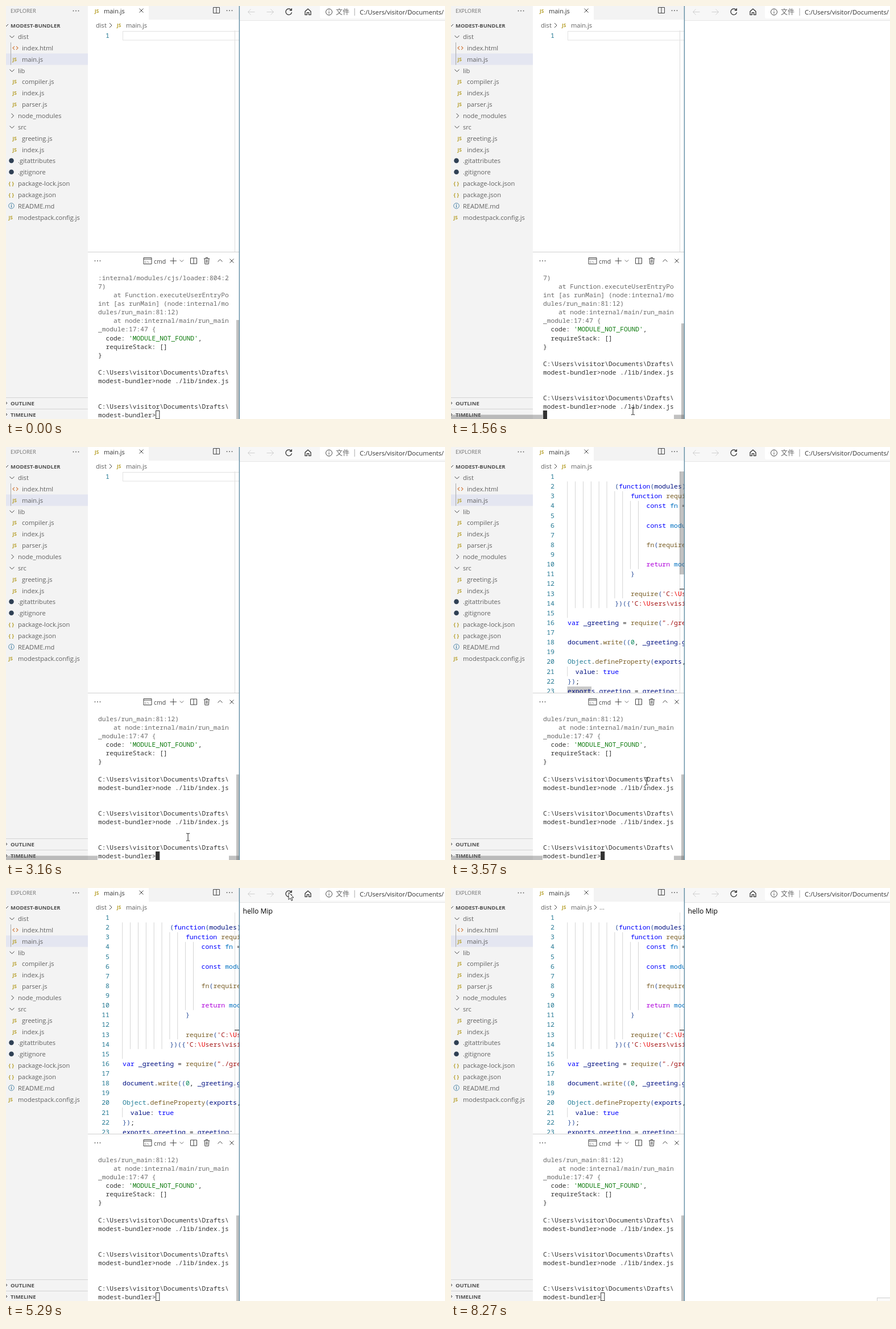
An HTML page for the animation above (8300 ms loop, 772 by 726 pixels).

```html
<!DOCTYPE html>
<html lang="en">
<head>
<meta charset="utf-8">
<title>Bundler demo</title>
<style>
  html, body { margin: 0; width: 100%; height: 100%; overflow: hidden; background: #fff; }
  svg { display: block; width: 772px; height: 726px; }
  text { white-space: pre; font-family: "Open Sans", "Noto Sans CJK SC", "Noto Sans CJK", sans-serif; }
  .mono { font-family: "Noto Sans Mono", "DejaVu Sans Mono", monospace; }
  .icon { fill: none; stroke: #424242; stroke-width: 1; }
</style>
</head>
<body>
<svg id="stage" viewBox="0 0 772 726"></svg>
<script>
const LOOP = 8300;
const PROJECT = 'modest-bundler';
const USER = 'visitor';
const stage = document.getElementById('stage');

const escapeText = s => s.replace(/&/g, '&amp;').replace(/</g, '&lt;');
const text = (x, y, s, size = 11.1, fill = '#616161', extra = '') =>
  `<text x="${x}" y="${y}" font-size="${size}" fill="${fill}" ${extra}>${escapeText(s)}</text>`;
const rect = (x, y, w, h, fill, extra = '') =>
  `<rect x="${x}" y="${y}" width="${w}" height="${h}" fill="${fill}" ${extra}/>`;
const path = (d, extra = '') => `<path class="icon" d="${d}" ${extra}/>`;
const dots = (x, y) => [-4.5, 0, 4.5].map(dx => rect(x + dx - .8, y - .8, 1.6, 1.6, '#555')).join('');
const chevron = (x, y, turn = 0) =>
  path('M-2 -4L2 0L-2 4', `transform="translate(${x} ${y}) rotate(${turn})"`);
const cross = (x, y) => path(`M${x - 3.5} ${y - 3.5}l7 7m0 -7l-7 7`);
const split = (x, y) => path(`M${x - 5.5} ${y - 5}h11v10h-11zm5.5 0v10`);
const jsBadge = (x, y) => text(x, y + 3, 'JS', 8.3, '#b7a02c', 'font-weight="700"');

// Sidebar
const FILES = [
  ['open', 0, 'dist'], ['html', 1, 'index.html'], ['js', 1, 'main.js'],
  ['open', 0, 'lib'], ['js', 1, 'compiler.js'], ['js', 1, 'index.js'], ['js', 1, 'parser.js'],
  ['shut', 0, 'node_modules'], ['open', 0, 'src'], ['js', 1, 'greeting.js'], ['js', 1, 'index.js'],
  ['dot', 0, '.gitattributes'], ['dot', 0, '.gitignore'],
  ['json', 0, 'package-lock.json'], ['json', 0, 'package.json'],
  ['info', 0, 'README.md'], ['js', 0, 'modestpack.config.js'],
];
const FILE_ICONS = {
  open: (x, y) => chevron(x + 1, y, 90),
  shut: (x, y) => chevron(x + 2, y),
  js: (x, y) => jsBadge(x - 5, y),
  html: (x, y) => path(`M${x - 1.5} ${y - 3}l-3 3l3 3m3 -6l3 3l-3 3`, 'style="stroke:#d17b3f;stroke-width:1.2"'),
  dot: (x, y) => `<circle cx="${x}" cy="${y - .5}" r="4.3" fill="#2f4054"/>`,
  json: (x, y) => text(x - 5, y + 3, '{ }', 9, '#b7a02c', 'font-weight="700"'),
  info: (x, y) => `<circle cx="${x}" cy="${y - .5}" r="4.8" fill="none" stroke="#4f87a8"/>` +
    rect(x - .7, y - 1.5, 1.4, 4, '#4f87a8') + rect(x - .7, y - 3.6, 1.4, 1.4, '#4f87a8'),
};

function sidebar() {
  const section = (y, label) => chevron(0, y) + text(8, y + 3.8, label, 9.5, '#505050', 'font-weight="700"');
  const rows = FILES.map(([icon, depth, name], i) => {
    const y = 54 + 19.85 * i;
    return FILE_ICONS[icon](9.5 + 7 * depth, y) + text(21 + 7 * depth, y + 4, name);
  });
  return rect(0, 0, 144, 726, '#f3f3f3') + rect(0, 83.5, 144, 20, '#e4e6f1') +
    rect(8, 64, 1, 39.5, '#a9a9a9') +
    text(8, 12, 'EXPLORER', 9.3, '#6f6f6f') + dots(123, 8.5) +
    chevron(0, 34, 90) + text(8, 37.5, PROJECT.toUpperCase(), 9.5, '#505050', 'font-weight="700"') +
    rows.join('') + rect(0, 688, 144, 1, '#d4d4d4') + section(698, 'OUTLINE') +
    rect(0, 708, 144, 1, '#d4d4d4') + section(718, 'TIMELINE');
}

// Editor
const COL = 6.93, LINE = 17.13;
const CODE = [
  '',
  '            (function(modules){', '                function require(', '                    const fn = ',
  '', '                    const module', '', '                    fn(require(', '',
  '                    return module', '                }', '',
  `                require('C:\\Users\\`, `            })({'C:\\Users\\${USER}`,
  '', 'var _greeting = require("./greeting', '', 'document.write((0, _greeting.greet', '',
  'Object.defineProperty(exports, ', '  value: true', '});', 'exports.greeting = greeting;',
];
const TOKENS = [
  [/^['"].*/, '#a31515'],
  [/^(function|const|var|true)\b/, '#0000ff'],
  [/^return\b/, '#af00db'],
  [/^(require|write|defineProperty)\b|^fn(?=\()/, '#795e26'],
  [/^(fn|module)\b/, '#0070c1'],
  [/^Object\b/, '#267f99'],
  [/^\w*[a-z_]\w*/i, '#001080'],
  [/^\d+/, '#098658'],
  [/^[(){}]/, '#2b4f9c'],
  [/^[^\w'"(){}]+/, '#222'],
];
function highlight(line) {
  let out = '';
  while (line) {
    const [rule, color] = TOKENS.find(([r]) => r.test(line));
    const token = line.match(rule)[0];
    const body = escapeText(token).replace(/\\U/g, '<tspan fill="#ee0000">\\U</tspan>');
    out += `<tspan fill="${color}">${body}</tspan>`;
    line = line.slice(token.length);
  }
  return out;
}
const lineNumber = (n, fill) =>
  text(182, 56 + LINE * (n - 1), String(n), 11.55, fill, 'class="mono" text-anchor="end"');

function codeView() {
  const guide = (k, from, to) =>
    rect(204.3 + 2 * COL * k, 60.5 + LINE * (from - 2), .9, LINE * (to - from + 1), '#d0d0d0');
  let out = guide(0, 2, 15) + guide(0, 21, 21);
  for (let k = 1; k < 10; k++) out += k < 6 ? guide(k, 2, 14) : k < 8 ? guide(k, 3, 13) : guide(k, 4, 10);
  CODE.forEach((line, i) => {
    const code = line.trimStart(), x = 205 + COL * (line.length - code.length);
    if (i) out += lineNumber(i + 1, '#237893');
    out += `<text class="mono" font-size="11.55" x="${x}" y="${56 + LINE * i}">${highlight(code)}</text>`;
  });
  return out + rect(402, 249, 8, 1.5, '#555');
}

function editor() {
  return rect(144, 0, 266, 24, '#f3f3f3') + rect(144, 0, 107, 24, '#fff') +
    jsBadge(156, 8.5) + text(172, 12.5, 'main.js', 11, '#333') + cross(238, 8) + split(370, 7.5) + dots(393, 8) +
    text(158, 38, 'dist') + chevron(184, 34) + jsBadge(195, 34) + text(211, 38, 'main.js') +
    `<g id="crumb">${chevron(254, 34)}${text(261, 38, '...')}</g>` +
    lineNumber(1, '#237893') + rect(402, 43, 1, 389, '#dcdcdc') +
    `<g id="blank">${rect(205.5, 44.5, 210, 15.5, 'none', 'stroke="#e2e2e2" clip-path="url(#editorClip)"')}</g>` +
    `<g id="code" clip-path="url(#editorClip)">
      <g id="mark">${rect(204.5, 421, 42.5, 11, '#c9c9c9')}</g>${codeView()}</g>` +
    rect(402, 43, 8, 181, '#646464', 'id="thumb"');
}

// Terminal
const CELL = 6.755, ROW = 15.03;
const FOLDER = `C:\\Users\\${USER}\\Documents\\Drafts\\`;
const PROMPT = PROJECT + '>', COMMAND = 'node ./lib/index.js';
const TRACE = [
  ':internal/modules/cjs/loader:804:2', '7)', '    at Function.executeUserEntryPo',
  'int [as runMain] (node:internal/mo', 'dules/run_main:81:12)',
  '    at node:internal/main/run_main', '_module:17:47 {',
  "  code: 'MODULE_NOT_FOUND',", '  requireStack: []', '}', '',
  FOLDER, PROMPT + COMMAND, '', '', FOLDER, PROMPT,
];
const termLine = (s, i) => {
  const body = s.trimStart(), x = 162 + CELL * (s.length - body.length);
  const inner = escapeText(body).replace(/'.*'/, '<tspan fill="#107c10">$&</tspan>');
  return `<text class="mono" font-size="11.27" x="${x}" y="${482.3 + ROW * i}" fill="${i < 7 ? '#6b6b6b' : '#333'}">${inner}</text>`;
};

function terminal() {
  const typed = text(162 + CELL * PROMPT.length, 482.3 + ROW * 16, COMMAND, 11.27, '#333', 'class="mono" id="typed"');
  return rect(144, 432, 266, 1, '#cfcfcf') + dots(161, 448) +
    path('M242 442.5h14v11h-14zm0 2.5h14') + text(244, 451.5, 'C:\\', 5.5, '#424242') +
    text(260, 452.5, 'cmd', 10.5, '#424242') + path('M288.5 448h11.5m-5.75 -5.75v11.5') +
    chevron(309, 448, 90).replace('rotate(90)', 'rotate(90) scale(.8)') + split(330, 448) +
    path('M348 444h10m-6.5 0v-1.8h3V444m-5.5 0l.8 9.5h6.4l.8 -9.5m-5 2v5.5m2 -5.5v5.5') +
    chevron(376.5, 447.5, -90) + cross(397, 448) +
    `<g clip-path="url(#termClip)"><g id="output">${TRACE.map(termLine).join('')}${typed}
      <g id="next">${termLine(FOLDER, 19)}${termLine(PROMPT, 20)}</g></g></g>` +
    rect(0, 711.5, 6.2, 14, '#333', 'id="caret" stroke="#333"') +
    rect(405, 552, 5, 174, '#c1c1c1', 'id="termThumb"') +
    `<g id="strip" opacity=".4">${rect(0, 718.5, 161, 8, '#646464')}${rect(392, 718.5, 18, 8, '#646464')}</g>`;
}

// Browser
function browser() {
  const arrow = (x, dir) => path(`M${x - 6 * dir} 10.5h${12 * dir}m${-5 * dir} -5l${5 * dir} 5l${-5 * dir} 5`, 'style="stroke:#d0d0d0"');
  return rect(410, 0, 362, 726, '#fff') + rect(411, 0, 361, 25, '#f7f7f7') + rect(411, 25, 361, 1, '#e6e6e6') +
    rect(552, -6, 230, 28, '#fff', 'rx="3"') + arrow(431.5, -1) + arrow(464.5, 1) +
    path('M501.5 7A5.3 5.3 0 1 0 502.5 11M502.3 4v3.6h-3.6', 'style="stroke:#222;stroke-width:1.2"') +
    path('M526 9.5l5 -4.5l5 4.5v6h-3.4v-4h-3.2v4H526z', 'style="stroke:#222;stroke-width:1.2"') +
    '<circle class="icon" cx="568" cy="10.5" r="5.5"/>' + rect(567.5, 9.5, 1, 4, '#555') + rect(567.5, 7, 1, 1.2, '#555') +
    text(580, 15, '文件', 12, '#666') + rect(612.5, 4, 1, 13, '#aaa') +
    text(622, 15, `C:/Users/${USER}/Documents/`, 11.2, '#333') +
    text(416.5, 44.5, 'hello Mip', 12.2, '#000', 'id="hello"') +
    rect(749.5, 720.5, 30, 12, '#fafafa', 'id="corner" stroke="#cfcfcf"') +
    rect(409.7, 0, 1.4, 726, '#5f8ca2');
}

stage.innerHTML = `<defs>
  <clipPath id="editorClip"><rect x="144" y="43" width="266" height="389"/></clipPath>
  <clipPath id="termClip"><rect x="144" y="471" width="266" height="255"/></clipPath></defs>` +
  rect(0, 0, 772, 726, '#fff') + sidebar() + editor() + terminal() + browser() +
  `<g id="arrow"><path d="M0 0v12.5l3 -2.8l2 4.6l2 -.9l-2 -4.5h4z" fill="#fff" stroke="#222" stroke-width=".9"/></g>
   <g id="beam"><path d="M-3 -6.5h2.2l.8 .8l.8 -.8H3M0 -6V6M-3 6.5h2.2l.8 -.8l.8 .8H3" fill="none" stroke="#222"/></g>`;

// Timeline in ms
const at = { strip: 400, focus: 900, type: 1130, enter: 2650, done: 3160, code: 3230,
  blur: 4830, reload: 5270, crumb: 5500, corner: 7270 };
const POINTER = [
  [30, 632, 700], [300, 470, 714], [650, 320, 712], [2050, 320, 712], [2320, 320, 686], [3160, 320, 686],
  [3570, 344, 588], [3980, 365, 430], [4300, 361, 145], [4420, 400, 120], [4730, 537, 101], [4860, 537, 101],
  [5050, 474, 62], [5270, 497, 8], [5850, 497, 8], [6340, 768, 570],
];
const CORNER_VISIT = [[6690, 752, 672], [6750, 763, 702]];

function pointerAt(t) {
  const track = [POINTER, CORNER_VISIT].find(p => t >= p[0][0] && t < p[p.length - 1][0]);
  if (!track) return null;
  const i = track.findIndex(p => p[0] > t);
  const [t0, x0, y0] = track[i - 1], [t1, x1, y1] = track[i];
  const k = (t - t0) / (t1 - t0);
  return [x0 + (x1 - x0) * k, y0 + (y1 - y0) * k];
}

const el = id => document.getElementById(id);
const parts = Object.fromEntries([...stage.querySelectorAll('[id]')].map(e => [e.id, e]));
const show = (id, on) => { parts[id].style.display = on ? '' : 'none'; };

function render(t) {
  const scroll = t < at.type ? 0 : t < at.enter ? 1 : t < at.done ? 2 : 4;
  parts.output.setAttribute('transform', `translate(0 ${-ROW * scroll})`);
  const thumbTop = 552 + 5.9 * scroll;
  parts.termThumb.setAttribute('y', thumbTop);
  parts.termThumb.setAttribute('height', 726 - thumbTop);
  show('typed', t >= at.type);
  show('next', t >= at.done);

  const focused = t >= at.focus && t < at.blur;
  const wrapped = t >= at.type && t < at.done;
  parts.caret.setAttribute('x', 162.3 + (wrapped ? 0 : CELL * PROMPT.length));
  parts.caret.setAttribute('fill', focused ? '#333' : 'none');
  show('strip', t >= at.strip && t < at.blur);

  show('blank', t < at.code);
  show('code', t >= at.code);
  show('mark', t < at.blur);
  show('crumb', t >= at.crumb);
  const fade = Math.min(1, Math.max(0, (5200 - t) / 700));
  parts.thumb.setAttribute('opacity', t < at.code ? 0 : .4 * fade);
  show('hello', t >= at.reload);
  show('corner', t >= at.corner);

  const pos = pointerAt(t);
  const overPage = pos && pos[0] > 410;
  show('arrow', overPage);
  show('beam', pos && !overPage);
  if (pos) parts[overPage ? 'arrow' : 'beam'].setAttribute('transform', `translate(${pos})`);
}

const start = performance.now();
function tick() {
  render((performance.now() - start) % LOOP);
  requestAnimationFrame(tick);
}
tick();
</script>
</body>
</html>
```
